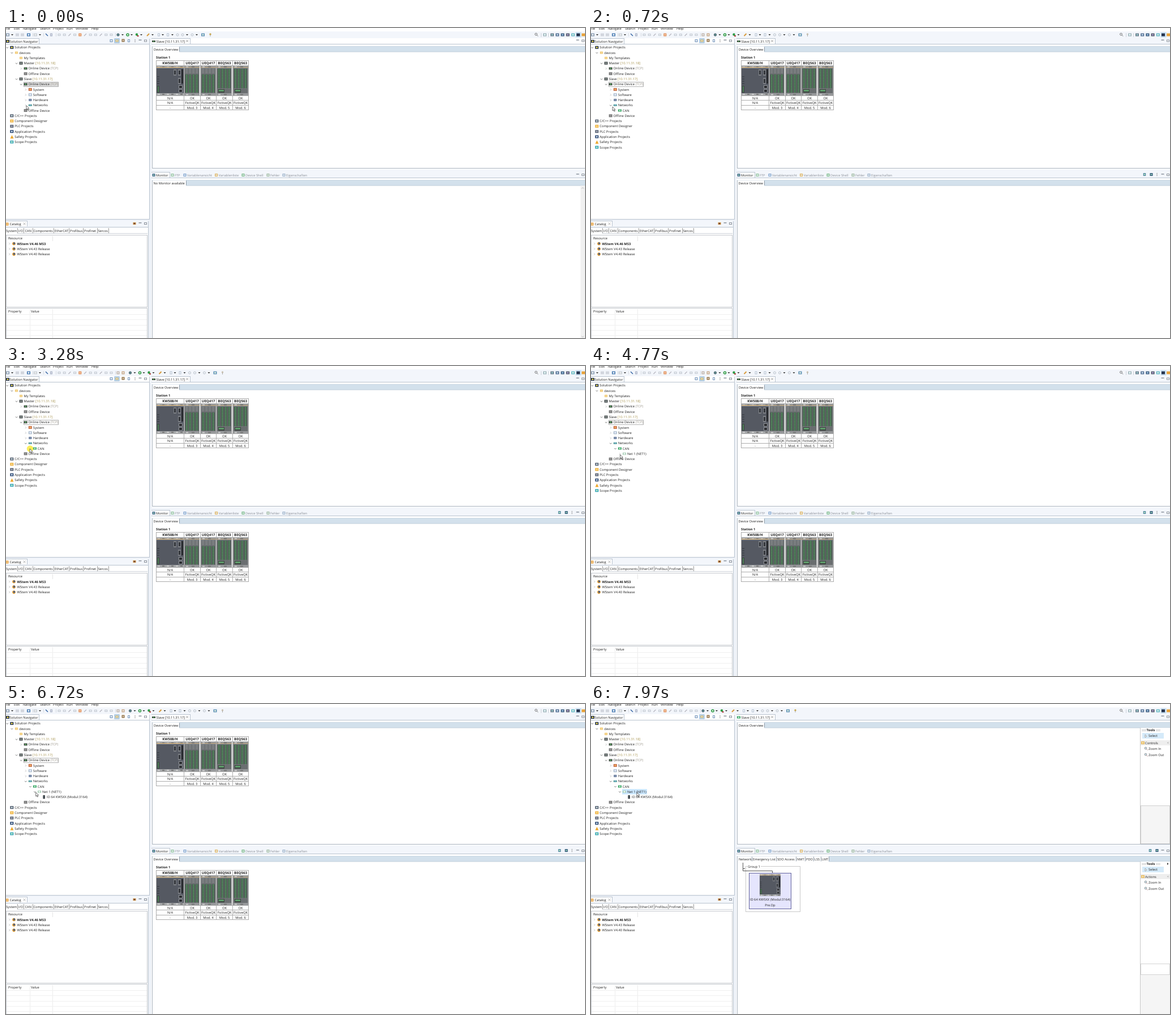
An HTML page with a canvas that plays this animation: 1023 px wide and 547 px high, repeating every 8 s.

```html
<!DOCTYPE html>
<html lang="en">
<head>
<meta charset="utf-8">
<title>Solution Navigator</title>
<style>
html, body { margin: 0; width: 100%; height: 100%; overflow: hidden; background: #fff; }
canvas { display: block; width: 1023px; height: 547px; }
</style>
</head>
<body>
<canvas id="stage" width="1023" height="547"></canvas>
<script>
const g = document.getElementById('stage').getContext('2d');
g.textRendering = 'geometricPrecision';
const LOOP = 8000, BAR = '#d3e1ec', CHROME = '#f3f6fb', EDGE = '#b9c3cf';

function rect(x, y, w, h, fill, stroke) {
  if (fill) { g.fillStyle = fill; g.fillRect(x, y, w, h); }
  if (stroke) { g.strokeStyle = stroke; g.lineWidth = 1; g.strokeRect(x + .5, y + .5, w - 1, h - 1); }
}
function path(points, color, width = 1, fill) {
  g.beginPath();
  points.forEach(([x, y]) => g.lineTo(x, y));
  if (fill) { g.closePath(); g.fillStyle = fill; g.fill(); }
  if (color) { g.strokeStyle = color; g.lineWidth = width; g.stroke(); }
}
const hline = (x1, x2, y, c) => rect(x1, y, x2 - x1, 1, c);
const vline = (x, y1, y2, c) => rect(x, y1, 1, y2 - y1, c);
function disc(x, y, r, fill, stroke, width = 1) {
  g.beginPath();
  g.arc(x, y, r, 0, 7);
  if (fill) { g.fillStyle = fill; g.fill(); }
  if (stroke) { g.strokeStyle = stroke; g.lineWidth = width; g.stroke(); }
}
// y is the middle of the capitals; returns the right end
function text(s, x, y, { c = '#222', size = 5.8, bold = false, align = 'left' } = {}) {
  g.font = `${bold ? 'bold ' : ''}${size}px "Open Sans", "Noto Sans", sans-serif`;
  g.textAlign = align;
  g.fillStyle = c;
  g.fillText(s, x, y + 2.1);
  return x + g.measureText(s).width;
}
function icon(x, y, main, accent, w = 6, h = 5) {
  rect(x - w / 2, y - h / 2, w, h, main);
  if (accent) rect(x - w / 4, y - h / 4, w / 2, h / 2, accent);
}
const drop = (x, y) => path([[x - 2, y - 1], [x + 2, y - 1], [x, y + 1.2]], null, 0, '#333');
function twisty(x, y, open) {
  if (open) path([[x - 1.7, y - .8], [x, y + .9], [x + 1.7, y - .8]], '#555', .8);
  else path([[x - .8, y - 1.7], [x + .9, y], [x - .8, y + 1.7]], '#aaa', .7);
}
function cross(x, y) {
  path([[x - 2, y - 2], [x + 2, y + 2]], '#999', .8);
  path([[x + 2, y - 2], [x - 2, y + 2]], '#999', .8);
}
function minMax(x, y) {
  rect(x - 2.5, y - 2, 5, 1.5, '#8a929c');
  rect(x + 7, y - 2, 5, 4, '#fff', '#8a929c');
}
const dots = (x, y) => [-2, 0, 2].forEach(d => rect(x - .5, y + d - .5, 1, 1, '#555'));

function toolbar(debug) {
  rect(0, 0, 1023, 18, CHROME);
  rect(0, 0, 1023, 6, '#fff');
  [['File', -2], ['Edit', 14], ['Navigate', 30], ['Search', 60], ['Project', 83], ['Run', 107],
   ['Window', 123], ['Help', 151]].forEach(([s, x]) => text(s, x, .6));
  icon(3, 12, '#8296ad', '#fff');
  drop(11, 12);
  icon(20, 12, '#d2d6de');
  icon(29, 12, '#d2d6de');
  icon(40, 12, '#3c73ad', '#fff');
  icon(52, 12, '#c9d0d6', '#eee');
  drop(60, 12);
  path([[70, 10], [74, 14]], '#3465a4', 1.5);
  icon(80, 12, '#a9b4c4', '#dde', 4);
  for (let i = 0; i < 11; i++) {
    const x = 94 + i * 9.2;
    if (i === 4) icon(x, 12, '#e18b55', '#f4d0b0', 5);
    else if (i % 3 === 2) path([[x - 2, 14], [x + 2, 10]], '#b5b5be', 1.1);
    else icon(x, 12, '#c6ccd5', '#eef1f5', 5, 4);
  }
  [47, 66, 88, 193].forEach(x => vline(x, 9, 15, '#d5dae1'));
  const d = debug ? 21.5 : 0;
  if (debug) { icon(198, 12, '#b9ada4', '#eee', 5); icon(207, 12, '#c4a07c', '#eee', 5); }
  disc(198 + d, 12, 2.2, '#5a8a8a', '#456', .8);
  disc(215 + d, 12, 2.8, '#2e9b44');
  path([[214 + d, 10.5], [217 + d, 12], [214 + d, 13.5]], null, 0, '#fff');
  disc(231 + d, 11.5, 2.2, '#2e9b44');
  icon(233 + d, 14, '#a33', null, 3, 2);
  path([[249 + d, 14], [253 + d, 10]], '#d99a3a', 2);
  icon(270 + d, 12, '#b7c4d4', '#fff', 4);
  icon(286 + d, 12, '#b7c4d4', '#fff', 4);
  [303, 312, 329].forEach(x => disc(x + d, 12, 2, null, '#b3bac4', .9));
  icon(348 + d, 12, '#5b8fb5', '#dff0e0');
  disc(361 + d, 11, 1.7, debug ? '#c9bfae' : '#c8a64b');
  rect(360.5 + d, 12, 1, 3, '#aaa');
  [206, 222, 239, 259, 277, 294, 320, 337].forEach(x => drop(x + d, 12));
  disc(936.5, 11, 1.9, null, '#555', .8);
  path([[938, 12.5], [940, 14.5]], '#555', .9);
  vline(945, 9, 16, '#ccd2da');
  vline(958, 9, 16, '#ccd2da');
  icon(952, 12, '#9cb2b8', '#eff');
  rect(1006.5, 7.5, 10, 9, '#c8dff2');
  [['#678', '#9cc'], ['#46658a', '#cde'], ['#357', '#9bd'], ['#4b5563', '#a9c'],
   ['#5ab3c4', '#e4f4e8'], ['#26344f'], ['#e8a33a']].forEach(([a, b], i) => icon(965 + i * 9.2, 12, a, b));
}

const sheet = (x, y, w) => { rect(x, y, w, 10, '#fff'); hline(x, x + w, y, EDGE); vline(x + w, y, y + 10, EDGE); };

function tree(s) {
  rect(0, 18, 255, 11, s.focus === 'idle' ? CHROME : '#fff');
  sheet(0, 18, 58);
  icon(3, 23.5, '#1c2b4a', '#e8d44d');
  text('Solution Navigator', 6.5, 23.5);
  rect(191.5, 18.5, 9, 8, '#cfe3f5', '#8fb5d8');
  icon(186, 22.5, '#7d9cc0', '#fff', 5);
  icon(196, 22.5, '#c9ab52', '#eee', 5, 4);
  icon(207, 22, '#8a6b3c', '#dcb', 5);
  icon(217, 22.5, '#7d9cc0', '#fff', 4);
  dots(228, 22.5);
  minMax(237, 22.5);
  rect(0, 28, 254, 310, '#fff');
  hline(0, 254, 28, EDGE);
  hline(0, 254, 337, EDGE);
  vline(253, 19, 338, EDGE);

  const folder = ['#efc46a', '#f8e2a8', 5, 4], plc = ['#4b5052', '#8a9490'];
  const rows = [
    [0, 1, 'Solution Projects', ['#1c2b4a', '#e8d44d']],
    [1, 1, 'devices', folder],
    [2, , 'My Templates', folder],
    [2, 1, 'Master', plc, ' [10.11.31.18]'],
    [3, 0, 'Online Device', ['#3c443f', '#5fae66', 6, 4], ' (TCP)'],
    [3, , 'Offline Device', ['#777', '#999']],
    [2, 1, 'Slave', plc, ' [10.11.31.17]'],
    [3, 1, 'Online Device', ['#3c443f', '#5fae66', 6, 4], ' (TCP)'],
    [4, 0, 'System', ['#c4694a', '#f2b35c']],
    [4, 0, 'Software', ['#a9bccb', '#eef']],
    [4, 0, 'Hardware', ['#5b6f96', '#9ab', 5, 4]],
    [4, s.networks, 'Networks', ['#4d9a8c', '#79aee0', 6, 3]]
  ];
  if (s.networks) rows.push([5, s.can, 'CAN', ['#29a05a', '#d5f0dd', 6, 4]]);
  if (s.can) rows.push([6, s.net, 'Net 1 (NET1)', ['#a5cdb4', '#fff', 6, 4]]);
  if (s.net) rows.push([7, , 'ID 64 KW5XX (Modul:3164)', ['#2b2f2e', '#567', 3.5, 6]]);
  rows.push([3, , 'Offline Device', ['#777', '#999']],
    [0, , 'C/C++ Projects', ['#4a5568', '#cdd']],
    [0, , 'Component Designer', ['#eeb03a', '#f8dd98']],
    [0, , 'PLC Projects', ['#55606e', '#aab']],
    [0, , 'Application Projects', ['#1f3c68', '#cde']],
    [0, , 'Safety Projects', 'triangle'],
    [0, , 'Scope Projects', ['#2fa3b8', '#bfe8c8']]);

  const picked = 34.3 + 7 * 9.27;
  if (s.focus) rect(31, Math.round(picked - 4), 62, 9, s.focus === 'idle' ? '#dcdcdc' : '#fff', '#b4b4b4');
  if (s.netFill) rect(55, 150, 44, 9.5, s.netFill);
  rows.forEach(([level, open, label, look, note], i) => {
    const x = level * 8.12, y = 34.3 + i * 9.27;
    if (open !== undefined) twisty(x + 2.3, y + .3, open);
    if (look === 'triangle') path([[x + 7.5, y + 3], [x + 10.5, y - 3], [x + 13.5, y + 3]], null, 0, '#eda72c');
    else icon(x + 10.3, y, ...look);
    const end = text(label, x + 15.2, y, { size: 5.85 });
    if (note) text(note, end, y, { size: 5.85, c: note[1] === '(' ? '#9a958a' : '#a5914a' });
  });
}

function catalog() {
  rect(0, 340, 251, 207, CHROME);
  sheet(0, 340, 37);
  icon(2, 346, '#e39a3c', '#f7d9a0', 5);
  text('Catalog', 6.5, 346);
  cross(32.5, 345.5);
  icon(227, 345, '#c98a3c', '#644', 5, 4);
  minMax(237, 345);
  rect(0, 351, 251, 196, '#fff');
  hline(0, 251, 351, EDGE);
  vline(251, 341, 547, EDGE);
  [['System', 0], ['I/O', 22], ['CAN', 33.5], ['Components', 48.5], ['EtherCAT', 86], ['Profibus', 113],
   ['Profinet', 138], ['Sercos', 162.5]].forEach(([s, x]) => text(s, x, 357.5, { size: 5.7 }));
  [20, 31, 47, 84, 111, 136, 161, 181].forEach(x => vline(x, 353, 362, '#999'));
  hline(20, 250, 362, '#ccd1d8');
  rect(0, 365, 250, 128, '#fff', '#c4c8ce');
  text('Resource', 4, 371);
  vline(82, 367, 376, '#e5e5e5');
  ['WStem V4.46 MS3', 'WStem V4.43 Release', 'WStem V4.40 Release'].forEach((s, i) => {
    const y = 380.5 + i * 9.3;
    twisty(6, y, 0);
    disc(14, y, 2.8, '#d9952c');
    rect(13, y - 2, 3, 3, '#4a5f86');
    text(s, 19.5, y, { bold: !i });
  });
  rect(0, 494, 250, 60, '#fff', '#c4c8ce');
  text('Property', 4, 500);
  text('Value', 44, 500);
  [42, 82].forEach(x => vline(x, 496, 547, '#ededed'));
  for (let y = 505; y < 547; y += 9.3) hline(1, 249, Math.round(y), '#f0f0f0');
}

function cpu(x, y) {
  rect(x, y, 48, 52, '#555962');
  [0, 48].forEach(d => {
    rect(x, y + d, 48, 4, '#a4a6a8');
    for (let i = 0; i < 6; i++) rect(x + 2 + i * 8, y + d + 1, 4, 2, i % 2 ? '#777' : '#ccc');
  });
  rect(x, y + 2, 48, 1, '#cda25f');
  rect(x + 1, y + 35, 4, 12, '#4d7d58', '#3c4540');
  for (let i = 0; i < 4; i++) rect(x + 1, y + 18 + i * 4, 4, 2, '#43474e');
  [[30, 6], [38, 6], [38, 21]].forEach(([dx, dy]) => {
    rect(x + dx, y + dy, 5, 11, '#7c7f84');
    rect(x + dx + 1, y + dy + 2, 3, 7, '#34373c');
  });
  rect(x + 44, y + 6, 3, 25, '#2a2c30');
  [34, 41].forEach(dy => { rect(x + 39, y + dy, 7, 6, '#92959a'); rect(x + 40, y + dy + 1, 5, 4, '#2a2c30'); });
}
function ioModule(x, y, analog) {
  rect(x, y, 27, 52, '#97999b');
  rect(x + 1, y + 4, 25, 44, '#6a6e70');
  rect(x, y + 2, 27, 1, '#bd9f70');
  [0, 49].forEach(d => { rect(x + 3, y + d + .5, 4, 2, '#ccc'); rect(x + 13, y + d + .5, 5, 2, '#777'); });
  const top = analog ? 5 : 15, len = analog ? 34 : 32;
  for (let i = 0; i < 4; i++) {
    const sx = x + 2 + i * 6;
    if (!analog) for (let j = 0; j < 4; j++) rect(sx, y + 5 + j * 2.2, 4.5, 1, '#8c9092');
    rect(sx, y + top, 4.5, len, '#3d5244');
    rect(sx + 1, y + top, 2.5, len, '#4a7855');
    for (let d = 1; d < len; d += 2.5) rect(sx + 1.4, y + top + d, 1.6, 1, '#6c9574');
  }
  if (analog) { rect(x + 3, y + 41, 11, 6, '#3d4540'); rect(x + 4, y + 42, 9, 3, '#5f9c6b'); }
}
function station(dy) {
  text('Station 1', 265, 52 + dy, { bold: true, size: 5.7 });
  const cols = [265, 314, 343, 371, 400, 428];
  const heads = ['KW508/H', 'UEQ417', 'UEQ417', 'BEQ563', 'BEQ563'];
  heads.forEach((h, i) => {
    const mid = (cols[i] + cols[i + 1]) / 2 + .5, cell = { align: 'center', size: 5.8 };
    text(h, mid, 62 + dy, { align: 'center', bold: true, size: 6.1 });
    if (i) ioModule(cols[i] + 1, 67 + dy, i > 2); else cpu(266, 67 + dy);
    text(i ? 'OK' : 'N/A', mid, 123.5 + dy, cell);
    text(i ? 'FictiveQK' : 'N/A', mid, 132 + dy, cell);
    text(i ? 'Mod. ' + (i + 2) : '-', mid, 140.5 + dy, cell);
  });
  cols.forEach(x => vline(x, 57 + dy, 145 + dy, '#acacac'));
  [57, 66, 119, 127, 136, 144].forEach(y => hline(265, 429, y + dy, '#acacac'));
}

function tabs(y, names, end) {
  rect(259, y - 5, 764, 9.5, BAR);
  rect(259, y - 5, end - 259, 9.5, '#fff');
  names.forEach(([s, x], i) => {
    text(s, x, y, { size: 5.7 });
    vline(i + 1 < names.length ? names[i + 1][1] - 2 : end, y - 4, y + 4, '#8d99a5');
  });
  hline(end, 1023, y + 4, '#c2d0dc');
}
function toolsHead(y) {
  text('Tools', 989, y, { bold: true, align: 'center' });
  [-1, 1].forEach(d => { hline(973, 981, y + d, '#ccc'); hline(998, 1006, y + d, '#ccc'); });
}
function palette(y, group) {
  rect(970, y - 4, 53, 270, '#fff');
  vline(970, y - 4, y < 100 ? 248 : 547, '#c8c8c8');
  toolsHead(y);
  rect(974, y + 5, 38, 10, '#d5eaf9');
  path([[979, y + 8], [979, y + 13], [982, y + 11]], '#777', .6, '#fff');
  text('Select', 985, y + 10.3);
  rect(971, y + 18, 52, 9, '#eeeeee');
  icon(975, y + 22.5, '#e6b95e', '#f8e6b8');
  text(group, 979, y + 22.5);
  text('«', 1018, y + 22, { c: '#888' });
  [['Zoom In', 33], ['Zoom Out', 44]].forEach(([s, d]) => {
    disc(980, y + d - 1, 1.9, '#cfe4ee', '#777', .7);
    path([[981.5, y + d + .5], [983.5, y + d + 2.5]], '#a77', .9);
    text(s, 985, y + d);
  });
}

function editor(s) {
  rect(257, 18, 766, 232, CHROME);
  if (s.focus === 'idle') rect(257, 18, 766, 10, '#fff');
  sheet(257, 18, 68);
  if (s.canIcon) icon(261, 23.5, '#29a05a', '#d5f0dd', 6, 4);
  else icon(261, 23.5, '#3c443f', '#5fae66', 6, 3);
  text('Slave [10.11.31.17]', 265.5, 23.5);
  cross(320, 23);
  minMax(1010, 22.5);
  rect(257, 28, 766, 221, '#fff');
  hline(257, 1023, 28, EDGE);
  vline(258, 32, 248, '#a9b3be');
  hline(258, 1023, 247, '#a9b3be');
  hline(258, 1023, 32, '#c2d0dc');
  tabs(37.5, [['Device Overview', 261]], 306);
  if (!s.done) return station(0);
  palette(46, 'Controls');
  rect(971, 248, 52, 70, CHROME);
  rect(971, 179, 52, 68, '#f5f5f5', '#cfcfcf');
  hline(258, 1023, 247, '#a9b3be');
}

function network() {
  path([[268.5, 280], [268.5, 294.5], [320.5, 294.5], [320.5, 298]], '#555');
  hline(268, 272, 290, '#555');
  rect(273, 286, 97, 81, null, '#c9c9c9');
  rect(276, 284, 24, 5, '#fff');
  text('Group 1', 277, 286.5);
  rect(279, 298, 75, 64, '#e5e5fd', '#62629c');
  hline(273, 320, 294, '#555');
  g.save();
  g.translate(298, 300);
  g.scale(.77, .75);
  cpu(0, 0);
  g.restore();
  text('ID 64 KW5XX (Modul:3164)', 316.5, 345, { align: 'center' });
  text('Pre.Op', 316.5, 355, { align: 'center' });
}
function monitor(s) {
  rect(257, 249, 766, 298, CHROME);
  sheet(257, 254, 32);
  icon(261, 259.5, '#39608c', '#9fd0b0', 5);
  text('Monitor', 265, 259.7, { size: 5.75 });
  [['FTP', 298, '#8fc29b'], ['Variablenansicht', 320, '#7fa3cf'], ['Variablenliste', 375.5, '#dfb35f'],
   ['Device Shell', 423, '#76b886'], ['Fehler', 467, '#9db8a0'], ['Eigenschaften', 495, '#9db3cc']]
    .forEach(([label, x, c]) => {
      icon(x - 4, 259.5, c, '#eef3f6', 5);
      text(label, x, 259.7, { c: '#8a8f98', size: 5.7 });
    });
  minMax(1010, 259);
  if (s.monitor) {
    const shift = s.online ? 10 : 0;
    icon(978 + shift, 258.5, '#4d86a0', '#b6e0c0', 4.5);
    icon(990 + shift, 258.5, '#2f5578', '#8fc8b0', 5);
    if (!shift) dots(1000, 258.5);
  }
  rect(257, 265, 766, 282, '#fff');
  hline(257, 1023, 264, EDGE);
  vline(258, 268, 547, '#a9b3be');
  hline(258, 1023, 268, '#c2d0dc');
  if (s.online) {
    tabs(273.5, [['Network', 261], ['Emergency List', 286], ['SDO Access', 329], ['NMT', 364], ['PDO', 380],
      ['LSS', 395], ['LMT', 408]], 420);
    network();
    palette(282, 'Actions');
    rect(971, 458, 52, 89, '#f5f5f5');
    rect(971, 458, 52, 20, '#fff', '#d4d4d4');
  } else {
    tabs(273.5, [[s.monitor ? 'Device Overview' : 'No Monitor available', 260.5]], s.monitor ? 306 : 318);
    if (s.overview) station(236);
    if (s.tools) toolsHead(282);
  }
  if (s.tools) path([[1018, 280], [1020.5, 282], [1018, 284]], null, 0, '#333');
  if (!s.monitor) {
    rect(1015, 278, 8, 269, '#f1f1f1');
    path([[1017, 283.5], [1019, 281.5], [1021, 283.5]], '#aaa', .8);
    path([[1017, 543.5], [1019, 545.5], [1021, 543.5]], '#aaa', .8);
  }
}

// time, x, y of the pointer tip
const route = [[0, 36, 137], [80, 36, 137], [720, 38, 139], [950, 42, 143], [1190, 42, 146], [3980, 42, 146],
  [4540, 50, 156], [4770, 51.5, 156.5], [6640, 51.5, 156.5], [6720, 52.5, 156], [6880, 80, 155.5],
  [7430, 80, 155.5], [7580, 81, 156], [LOOP, 81, 156]];
function pointer(t, s) {
  const i = route.findIndex(k => k[0] > t), [t0, x0, y0] = route[i - 1], [t1, x1, y1] = route[i];
  const p = (t - t0) / (t1 - t0), x = x0 + (x1 - x0) * p, y = y0 + (y1 - y0) * p;
  if (s.press) disc(x + .5, y, 5.8, 'rgba(250, 232, 50, .8)');
  if (s.busy) {
    disc(80.5, 156.5, 3, '#d6efff', '#2d8fd8', 1.6);
    return;
  }
  const shape = [[0, 0], [0, 6.8], [1.6, 5.4], [2.7, 8], [3.9, 7.5], [2.8, 5], [4.9, 4.8]];
  path([...shape, [0, 0]].map(([dx, dy]) => [x + dx, y + dy]), '#333', .7, '#fff');
}

function draw(t) {
  const within = (a, b) => t >= a && t < b;
  const s = {
    networks: t >= 240, can: t >= 3610, net: t >= 5870,
    focus: t < 80 ? 'idle' : t < 7260 ? 'active' : '',
    netFill: t >= 7260 ? '#cce8ff' : t >= 6880 ? '#e5f3ff' : '',
    monitor: t >= 560, overview: t >= 790,
    canIcon: t >= 7580, tools: t >= 7820, online: t >= 7890, done: t >= 7970,
    busy: within(7730, 7970),
    press: within(80, 240) || within(3280, 3440) || within(5700, 5780) || within(7260, 7430)
  };
  rect(0, 0, 1023, 547, '#eef2f8');
  toolbar(within(560, 7430));
  tree(s);
  catalog();
  editor(s);
  monitor(s);
  pointer(t, s);
}
function tick(now) {
  draw(now % LOOP);
  requestAnimationFrame(tick);
}
requestAnimationFrame(tick);
</script>
</body>
</html>
```
